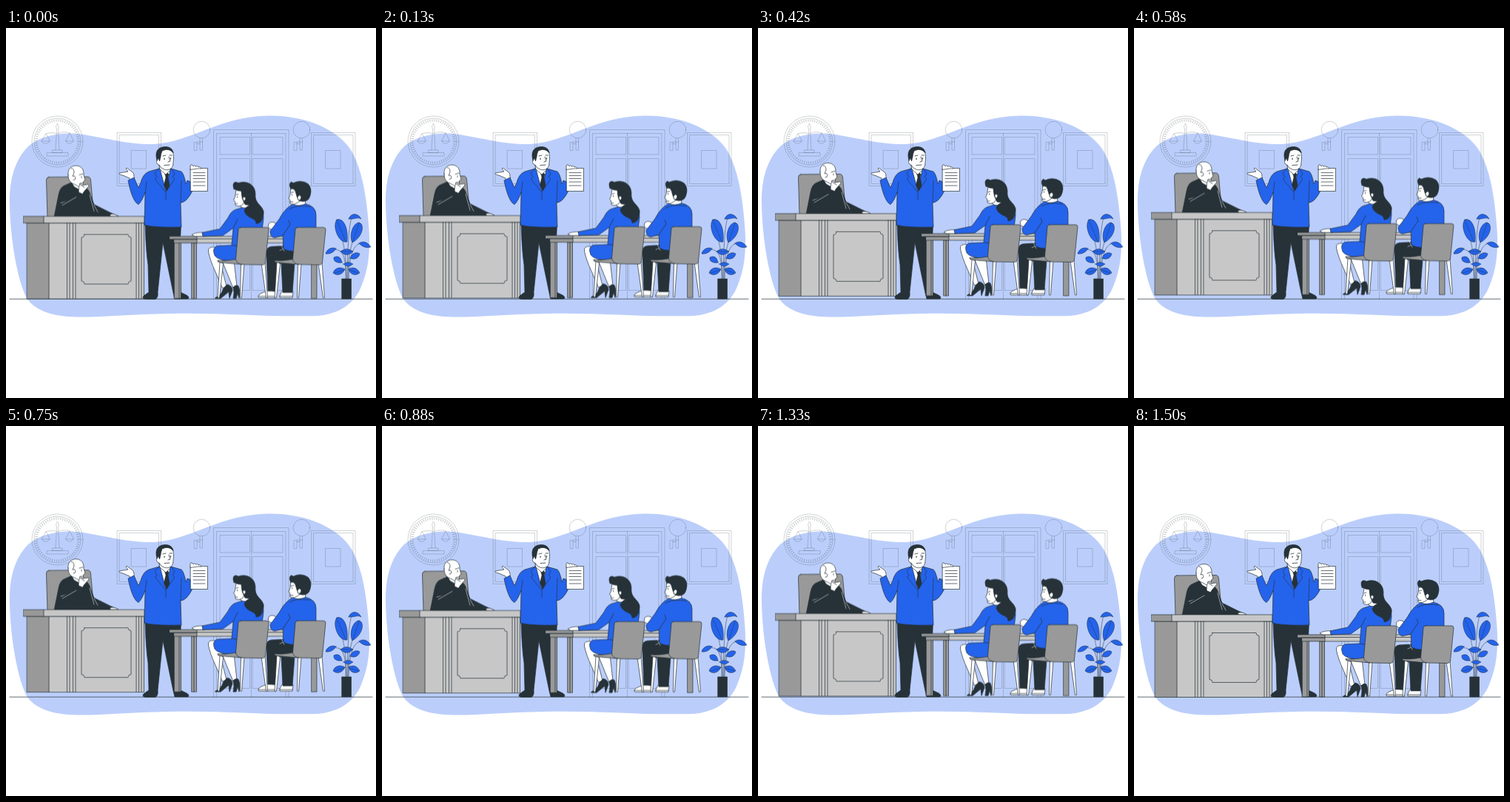
Recreate the animation shown at these times as an HTML page. Size 500x500 px, loop 1.54 s.

```html
<!DOCTYPE html>
<html lang="en">
<head>
<meta charset="utf-8">
<title>Courtroom</title>
<style>
html, body { margin: 0; width: 100%; height: 100%; overflow: hidden; background: #fff; }
svg { display: block; width: 100vw; height: 100vh; }
svg * { stroke-linejoin: round; stroke-linecap: round; }
.ink { stroke: #263238; stroke-width: .7; fill: none; }
.blue { fill: #2463eb; }
.dark { fill: #263238; }
.grey { fill: #999; }
.pale { fill: #c7c7c7; }
.white { fill: #fff; }
.wall { stroke: #263238; stroke-opacity: .36; stroke-width: .6; fill: none; }
.seam { stroke: #fff; stroke-width: .5; fill: none; }
.float { animation: float 1540ms linear -40ms infinite; }
@keyframes float { 50% { transform: translateY(-7px); } }
</style>
</head>
<body>
<svg viewBox="0 0 500 500">
<defs>
  <g id="chair">
    <path class="white" d="M289 317L286 365H288.500L293.500 319ZM317.500 319L316.500 365H318.500L322 319ZM345 318L351.500 365H353.500L350 317Z"/>
    <path class="grey" d="M317 270H352Q355 270 355 273L350.500 317Q350 321 345 320.500L319 320L290 317.500Q285 317 286 314.500Q294 316 310.500 313L314 273Q314 270 317 270Z"/>
    <path d="M310.500 313Q311 319 319 320"/>
  </g>
  <path id="picture" d="M150.500 141.500H209.500V213.500H150.500ZM153.500 144.500H206.500V210.500H153.500ZM169.500 165.500H189.500V190H169.500Z"/>
  <g id="lamp">
    <circle cx="264.500" cy="137.500" r="11.300"/>
    <path d="M254.500 154.500H258V165.500H254.500ZM258 156.500H262M258 154H266M262 149V165H265.500V149"/>
  </g>
</defs>

<path fill="#bbcefb" d="M5 240C4 205 12 178 30 160C45 146 75 139 105 144C140 150 170 158 200 157C250 154 290 119 355 118.500C405 118 450 137 468 168C482 195 487 228 490 265C493 300 490 325 481 347C472 372 450 387 420 389C350 391 290 384 220 386C170 387 130 391 95 390.500C65 390 40 383 28 365C15 340 6 285 5 240Z"/>

<g class="wall">
  <circle cx="69.500" cy="153.500" r="34.500"/>
  <circle cx="69.500" cy="153.500" r="31.500"/>
  <circle cx="69.500" cy="153.500" r="28.500" stroke-width="3.500" stroke-dasharray="1 2" stroke-opacity=".28" style="stroke-linecap:butt"/>
  <path d="M67 165L68.500 137Q66 133 69.500 129Q73 133 70.500 137L72 165M63 165H76V168.500H63ZM55.500 168.500H84V173H55.500ZM54 143Q62 140 69.500 143Q77 139 86 142M54 143L48 153H59ZM86 142L80.500 153H91ZM48 153Q53 160 59 153M80.500 153Q86 160 91 153"/>
  <use href="#picture"/>
  <use href="#picture" x="262.500"/>
  <use href="#lamp"/>
  <use href="#lamp" x="135"/>
  <path d="M280.500 366V137.500H382V366M284.500 366V142.500H378V366M289.500 147.500H329.500V171H289.500ZM333.500 147.500H374V171H333.500ZM289.500 176.500H329.500V354.500H289.500ZM333.500 176.500H374V354.500H333.500ZM331.500 142.500V366"/>
</g>

<path class="ink" d="M5 366.200H495"/>

<g class="ink" stroke-width=".5">
  <path d="M459 340C460 310 458 300 453 280M462 340C462 310 466 292 473 276M460 340C459 310 456 297 442 300M463 340C464 305 470 290 482 291M461 340C462 300 462 275 467 256" stroke-width=".5"/>
  <g class="blue" stroke-width=".5">
    <path d="M447 259C456 256 463 270 461 289C450 292 440 268 447 259ZM477 263C485 264 483 282 468 290C463 280 469 263 477 263ZM463 258C466 250 475 249 480 258C474 255 470 259 466 258ZM446 298C441 295 433 299 432 305C438 306 443 303 446 298ZM477 291C482 287 489 289 493 296C486 298 481 295 477 291Z"/>
    <path d="M452 302Q460 295 469 302Q460 311 452 302ZM454 317C448 318 442 316 443 310C449 307 453 310 454 317ZM465 311C467 304 474 302 478 305C477 311 471 314 465 311ZM456 319Q462 314 469 319Q462 325 456 319ZM458 326C452 322 444 324 442 331C448 336 455 333 458 326ZM463 326C468 322 475 324 478 331C472 336 465 333 463 326Z"/>
  </g>
  <path d="M447 260L459 288M477 264L469 288M453 302H468M444 331L457 327M464 327L476 331" stroke-width=".4"/>
  <path class="dark" d="M454 339H466.500V366H454Z"/>
</g>

<g class="float ink">
  <path class="grey" d="M58 202L110 201.500Q114 201.500 114.500 206L119 256H56L54.500 206Q54.500 202 58 202Z"/>
  <path class="dark" d="M65 256L71 226Q73 215 80 213L89 209L104 215Q112 217 114 226L119 239L141 250L152 255Z"/>
  <path class="seam" d="M74 237L96 230M113 226L119 248M119 240L124 249"/>
  <path class="white" d="M140 252.500Q147 250.500 152 255H142ZM88 208L92 215L99 219L103 215V208Z"/>
  <path class="white" d="M84 199C83 190 89 186.500 95 186.500C102 187 105.500 192 105 199L107 206L104.500 208L104 213Q100 217 95 213L89 210Q84 207 84 199Z"/>
  <path d="M88 190Q92 190 92 196L90 201Q93 199 94 203Q94 206 91 206M99 199L104 197.500M102 201V203M101 210H104"/>
  <path class="white" d="M98 222L96 229L100 232L105 222L112 214Q113 211 110 212L104 213L100 210Q98 215 98 222Z"/>
  <path d="M100 212L106 216"/>
  <path class="dark" d="M97 222L104 225L92 246L74 240Z"/>
  <path class="seam" d="M76 240L95 229"/>

  <path class="pale" d="M58 264H186.500V366.500H58Z"/>
  <path class="grey" d="M28.500 264H58V366.500H28.500Z"/>
  <path class="pale" d="M51 255H187V264H51Z"/>
  <path class="grey" d="M23.500 255H51V264H23.500Z"/>
  <path d="M82.500 264V366M86 264V366M90.500 264V366M94 264V366M176 264V366M179.500 264V366M183 264V366"/>
  <path d="M106 279.500H165Q165 283.500 169 283.500V342.500Q165 342.500 165 346.500H106Q106 342.500 102 342.500V283.500Q106 283.500 106 279.500Z"/>
</g>

<g class="ink">
  <path class="dark" d="M188 265Q189 300 192 320L193 357L186 362Q183 366 189 366.500H202Q206 364 205 357L212 290L226 358L228 366H246Q249 363 242 360L235.500 357L234 320L236.500 265Z"/>
  <path class="white" d="M173 203Q174 197 170 194L163 189Q161 190 165 194L153 196Q152 198 158 199L167 203L168 206Z"/>
  <path class="blue" d="M207 190L193 194Q185 197 182 209L179 216L173 202L165 206C168 222 173 236 179 238.500Q184 234 188 222L187 266Q199 270 237 269L236 236Q244 236 252 220L250 208L245 206L243 211Q241 198 237 194L223 190Z"/>
  <path class="white" d="M208 190L216 220L222 191Z"/>
  <path class="dark" d="M215 197L218 195.500L220 198L219 202L221 213L217 220L213.500 212L216 202Z"/>
  <path d="M207 190L201 196L204 202L201 204L216 222L228 204L225 201L228 197L223 190M216 222V232M190 208L188 224M237 206L236 236" stroke-width=".6"/>
  <path class="white" d="M207 184L208 191L216 198L222 192V186Z"/>
  <path class="white" d="M204 174C203 164 209 161 216 161C224 161 227 167 226.500 177L225.500 186C223 193 215 193 210 189L207 185Q202 184 204 178Z"/>
  <path class="dark" d="M204 179C201 168 204 161 215 160.500C222 160.500 225.500 164 226 169C222 163.500 216 163.500 211 166Q209 171 209 174L207.500 180L206 176Z"/>
  <path d="M212 173L216 172M221 172L224.500 172M220 174L222 180L219 181M214 185.500L221 185" stroke-width=".8"/>
  <path d="M214 176V177.500M222.500 175.500V177" stroke-width="1.100"/>
  <path class="white" d="M249.500 189.500H272.500V220.500H249.500Z"/>
  <path d="M253 195.500H269M253 199.500H269M253 203.500H269M253 208H269M253 213H269"/>
  <path class="white" d="M249 191V186Q251 183 253 187Q254 184 256.500 187Q258 185 260 188Q262 186 264 190L260 190Z"/>
</g>

<g class="float ink">
  <path class="grey" d="M413 315H420V366H413ZM251 291H257.500V366H251ZM227.500 290H236.500V366H227.500Z"/>
  <path d="M234 291V366M254 291V366"/>
  <path class="pale" d="M258 282H398V291H258Z"/>
  <path class="grey" d="M227 286H258V291H227ZM221 282H258V286H221Z"/>
  <path d="M258 285.500H398"/>

  <g id="woman">
    <path class="white" d="M283 297Q272 295 273.500 303Q276 315 283 330L292.500 352L298 350L290 318L300 314ZM292 315L307 352L312 350L308 314Z"/>
    <path class="dark" d="M283 365Q291 362 294 352L299 347Q306 349 306 355L302 366L301 357L290 366H283ZM307 351Q310 347 314 349Q317 355 315 366L313 359L311 366H307Q309 358 307 351Z"/>
    <path class="white" d="M267 277Q257 276 251 280L255 282L268 282Z"/>
    <path class="blue" d="M323 242L310 246Q304 248 300 257L289 272L265 277L266 282L293 281L307 271L305 294L285 295Q278 298 282 308Q287 315 304 315L341 314L348 258Q349 246 340 242Z"/>
    <path d="M307 271L313 259M305 294Q312 296 318 294"/>
    <path class="white" d="M317 235V242Q323 246 330 241L328 228Z"/>
    <path class="white" d="M311 219L309.500 229L307.500 233L309.500 235L310 240Q315 243 320 239L325 229L323 218Z"/>
    <path class="dark" d="M308 218C305 210 309 207 314 210C325 206 337 212 337 225Q336 233 342 239Q351 248 347 254Q347 264 338 265Q338 260 333 258Q323 254 322 247Q323 243 329 240L323 239Q318 231 318 221Q313 221 308 218Z"/>
    <path class="white" d="M320 230Q322.500 227 324 231Q323 235 321 234Z"/>
    <path d="M311 226L314 225M312.500 228V229.500M310.500 238H313"/>
  </g>

  <g id="client">
    <path class="white" d="M354 355L343 360Q339 364 342 365H365V357ZM373 356L370 362V365H387L388 357Z"/>
    <path d="M341 363H365M370 363H387"/>
    <path class="dark" d="M389 294L358 296Q351 297 352 306L354 356H365L366 324L372 318L374 358H387L390 318Z"/>
    <path class="seam" d="M370 301L377 298M371 292L376 302"/>
    <path class="white" d="M364 274L357 272Q353 270 355 265Q358 261 364 264L366 270Z"/>
    <path class="blue" d="M388 238L381 243Q374 249 369 259L357 275Q357 283 363 284L374 281L375 299Q388 306 404 298L419 283V253Q419 241 404 238Z"/>
    <path d="M374 281L384 266L382 261M383 245Q392 239 411 242"/>
    <path class="white" d="M389 233L388 239Q396 242 405 238L403 227Z"/>
    <path class="white" d="M385 216L384 226L382 231L384 233L384 238Q390 240 395 236L403 228L399 215Z"/>
    <path class="dark" d="M385 218Q382 213 384 210Q385 207 388 210Q399 205 408 211Q414 217 411 227Q409 235 401 235L396 234L393 228L391 221Q389 217 385 218Z"/>
    <path class="white" d="M394 229Q397 224 399 229Q398 234 395 233Z"/>
    <path d="M385 223L389 222M386.500 225V226.500M384 235.500H388"/>
  </g>

  <use href="#chair"/>
  <use href="#chair" x="77"/>
</g>
</svg>
</body>
</html>
```
